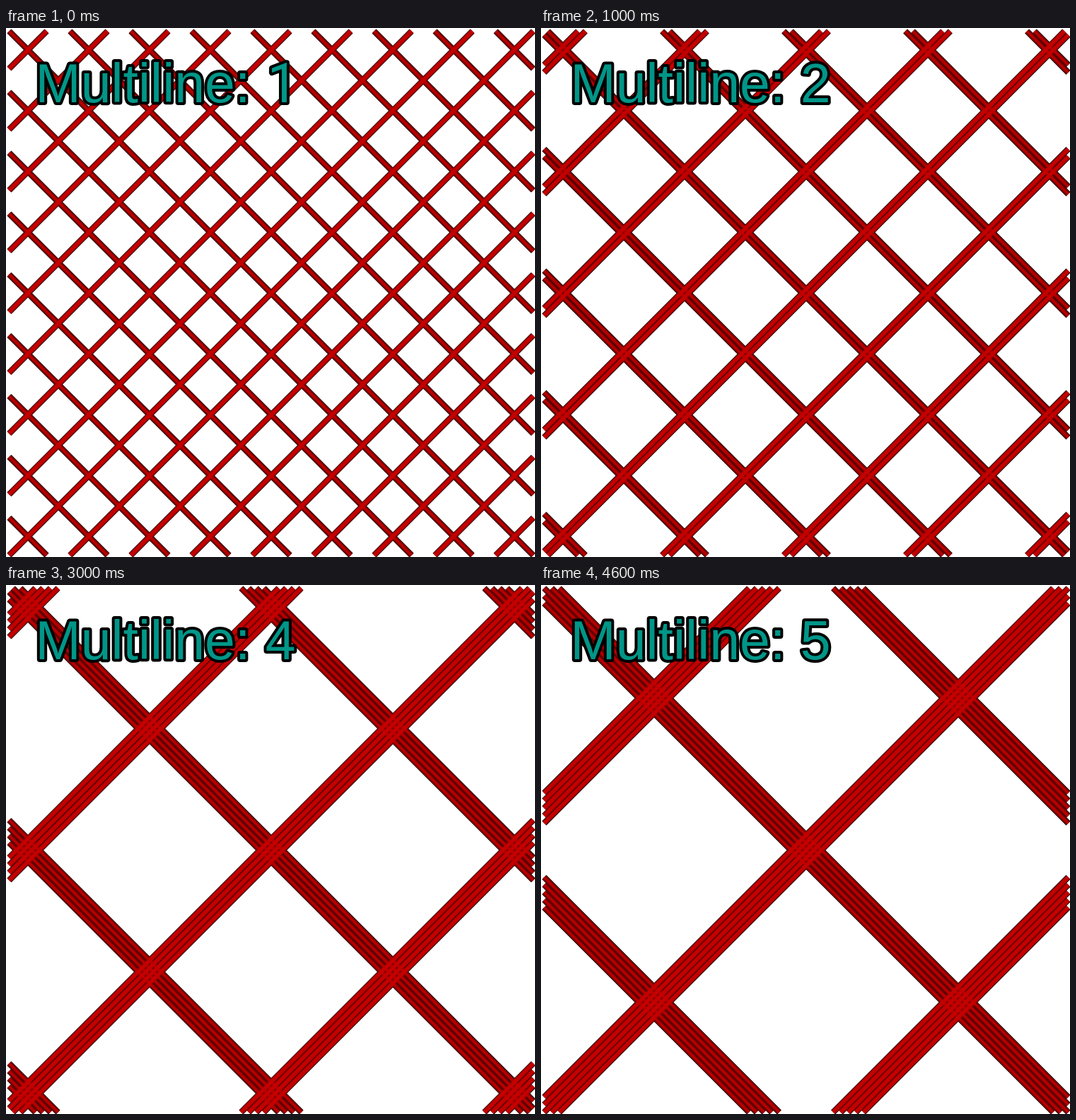
These frames come from a looping animation (748 px wide and 748 px high, 5 s). An HTML page with a canvas:

```html
<!DOCTYPE html>
<html lang="en">
<head>
<meta charset="utf-8">
<title>Multiline infill</title>
<style>
  html, body { margin: 0; width: 100%; height: 100%; overflow: hidden; background: #fff; }
  canvas { display: block; }
</style>
</head>
<body>
<canvas id="stage" width="748" height="748"></canvas>
<script>
const ctx = document.getElementById("stage").getContext("2d");
const CENTER = 375;
const REACH = 370.5;   // half side of the infill area
const PITCH = 86;      // horizontal distance between single lines
const STRAND = 10.7;   // horizontal distance between strands of one band
const STEP_MS = 1000;
const STEPS = 5;

// Horizontal offsets from the diagonal for every strand.
function strandOffsets(count) {
  const offsets = [];
  const period = PITCH * count;
  const bands = Math.ceil(2 * REACH / period);
  for (let b = -bands; b <= bands; b++) {
    for (let i = 0; i < count; i++) {
      const d = b * period + (i - (count - 1) / 2) * STRAND;
      if (Math.abs(d) < 2 * REACH - 4) offsets.push(d);
    }
  }
  return offsets;
}

// slope 1 runs down to the right, -1 runs up to the right
function strokeStrands(offsets, slope, width, color) {
  ctx.beginPath();
  for (const d of offsets) {
    const from = Math.max(-REACH, d - REACH);
    const to = Math.min(REACH, d + REACH);
    ctx.moveTo(CENTER + from, CENTER + slope * (from - d));
    ctx.lineTo(CENTER + to, CENTER + slope * (to - d));
  }
  ctx.lineWidth = width;
  ctx.strokeStyle = color;
  ctx.stroke();
}

function drawInfill(count) {
  const offsets = strandOffsets(count);
  ctx.lineCap = "butt";
  strokeStrands(offsets, 1, 8.6, "#1c0606");
  strokeStrands(offsets, -1, 8.6, "#1c0606");
  strokeStrands(offsets, 1, 7, "#780000");
  strokeStrands(offsets, -1, 7, "#9c0000");
  strokeStrands(offsets, 1, 3.4, "#b80000");
  strokeStrands(offsets, -1, 4.6, "#c40000");
}

function drawLabel(count) {
  const sans = '77px "Liberation Sans", Arial, sans-serif';
  const parts = [["Multiline: ", 41.5, sans]];
  // Roboto has a "1" without a foot
  parts.push(count === 1
    ? ["1", 369.5, "77px Roboto, sans-serif"]
    : [String(count), 366.7, sans]);

  ctx.lineJoin = "round";
  ctx.lineWidth = 8;
  ctx.strokeStyle = "#000";
  ctx.fillStyle = "#009688";
  for (const paint of ["strokeText", "fillText"]) {
    for (const [text, x, font] of parts) {
      ctx.font = font;
      ctx[paint](text, x, 105);
    }
  }
}

function draw(count) {
  ctx.fillStyle = "#fff";
  ctx.fillRect(0, 0, 748, 748);
  drawInfill(count);
  drawLabel(count);
}

const start = performance.now();
function tick() {
  const elapsed = performance.now() - start;
  draw(Math.floor(elapsed / STEP_MS) % STEPS + 1);
  requestAnimationFrame(tick);
}
tick();
</script>
</body>
</html>
```
